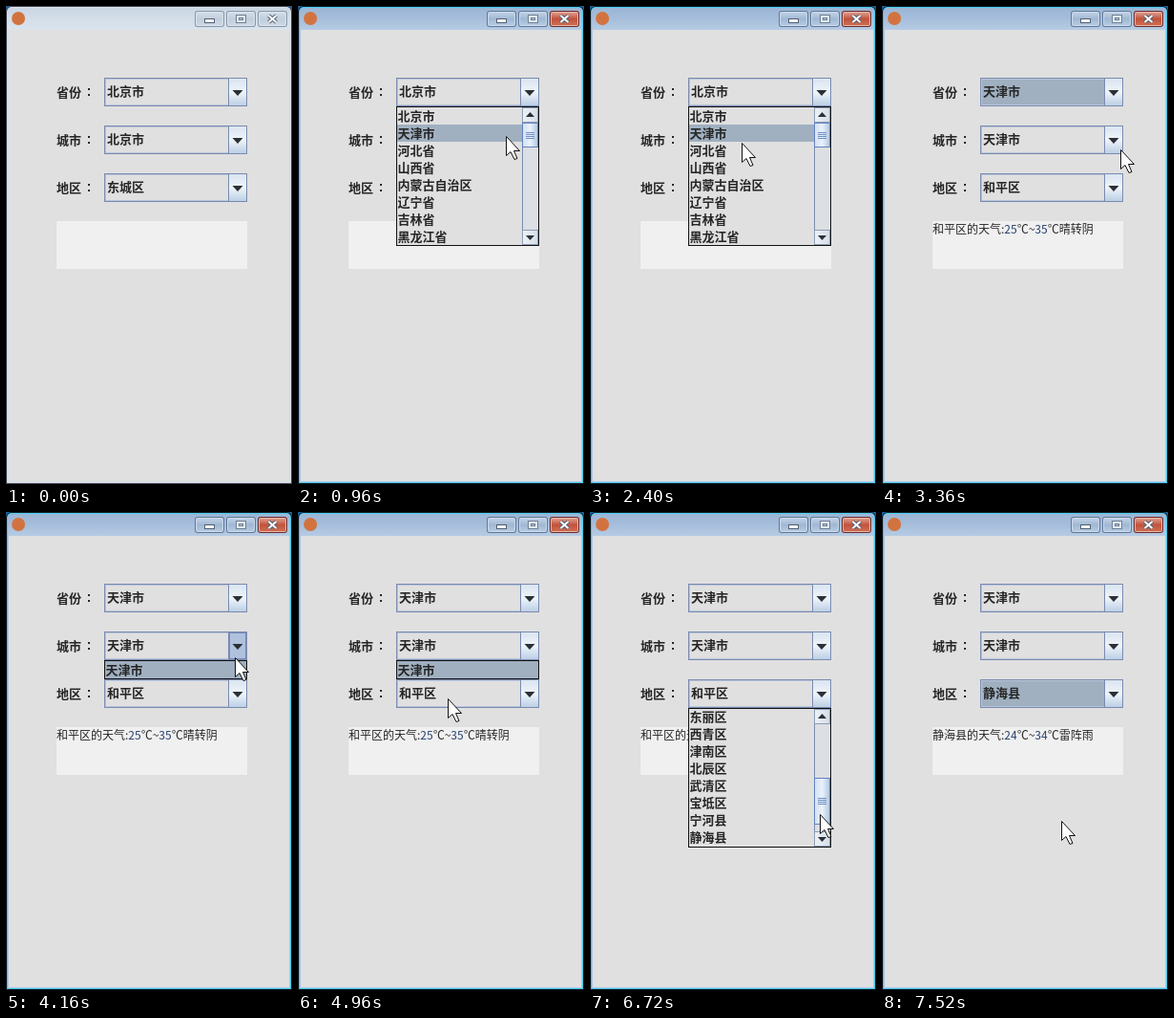
An HTML page with a canvas that plays this animation: 300x500 px, repeating every 8000 ms.

```html
<!DOCTYPE html>
<html lang="zh-CN">
<head>
<meta charset="utf-8">
<title>天气</title>
<style>
html, body { margin: 0; width: 100%; height: 100%; overflow: hidden; background: #e0e0e0; }
canvas { display: block; }
</style>
</head>
<body>
<canvas id="stage" width="300" height="500"></canvas>
<script>
const c = document.getElementById('stage').getContext('2d');
const LOOP = 8000, STEP = 160, ROW = 18, ROWS = 8, TRAVEL = 640;
const BG = '#e0e0e0', SELECTED = '#a0b0c0', BORDER = '#7a8ab0', INK = '#262626';
const SANS = '"Noto Sans CJK SC", "Noto Sans CJK", sans-serif';
const BOLD = 'bold 13px ' + SANS, PLAIN = '12px ' + SANS;

// Moments of the clicks
const OPEN_PROVINCE = 640, PICK_PROVINCE = 2720, OPEN_CITY = 3840,
  OPEN_DISTRICT = 5440, GRAB = 6240, DROP = 6720, PICK_DISTRICT = 7520;

const provinces = '北京市 天津市 河北省 山西省 内蒙古自治区 辽宁省 吉林省 黑龙江省'.split(' ');
const districts = ('和平区 河东区 河西区 南开区 河北区 红桥区 塘沽区 汉沽区 大港区 ' +
  '东丽区 西青区 津南区 北辰区 武清区 宝坻区 宁河县 静海县 蓟县').split(' ');
const PROVINCE_COUNT = 34;

// Pointer stops: arrival time, x, y
const stops = [
  [STEP, 284, 150], [OPEN_PROVINCE, 240, 90], [960, 218, 136], [1120, 179, 191],
  [1440, 159, 181], [2400, 159, 143], [3360, 250, 150], [3680, 240, 145],
  [4160, 240, 152], [4960, 157, 195], [5120, 157, 195], [OPEN_DISTRICT, 239, 190],
  [5760, 181, 275], [GRAB, 240, 260], [DROP, 241, 316], [7200, 204, 342],
  [PICK_DISTRICT, 188, 323]
];

const within = (t, a, b) => t >= a && t < b;
const clamp = (v, a, b) => Math.min(Math.max(v, a), b);

// The pointer rests at a stop, then spends at most TRAVEL on the way to the next
function pointerAt(t) {
  const i = clamp(stops.findIndex(s => s[0] >= t), 1, stops.length - 1);
  const [t0, x0, y0] = stops[i - 1], [t1, x1, y1] = stops[t > PICK_DISTRICT ? stops.length - 1 : i];
  const from = Math.max(t0, t1 - TRAVEL);
  const p = t > PICK_DISTRICT ? 1 : clamp((t - from) / (t1 - from), 0, 1);
  return [Math.round(x0 + (x1 - x0) * p), Math.round(y0 + (y1 - y0) * p)];
}

function dragAt(t) {
  return t < GRAB ? 0 : pointerAt(Math.min(t, DROP))[1] - pointerAt(GRAB)[1];
}

const scrollOf = drag => Math.round(drag * 2.91);

// Last row the pointer has touched since the list opened
function hoverAt(t, opened, top) {
  let row = 0;
  for (let s = opened; s <= t; s += STEP) {
    const [x, y] = pointerAt(s);
    if (within(x, 104, 235)) {
      row = Math.max(0, Math.floor((y - top - 3 + scrollOf(dragAt(s))) / ROW));
    }
  }
  return row;
}

function rect(x, y, w, h, fill) {
  c.fillStyle = fill;
  c.fillRect(x, y, w, h);
}

function box(x, y, w, h, edge, fill) {
  rect(x, y, w, h, edge);
  rect(x + 1, y + 1, w - 2, h - 2, fill);
}

function round(x, y, w, h, r, fill) {
  c.fillStyle = fill;
  c.beginPath();
  c.roundRect(x, y, w, h, r);
  c.fill();
}

function shade(x0, y0, x1, y1, ...colors) {
  const g = c.createLinearGradient(x0, y0, x1, y1);
  colors.forEach((color, i) => g.addColorStop(i / (colors.length - 1), color));
  return g;
}

function text(s, x, y, font = BOLD, color = INK) {
  c.font = font;
  c.fillStyle = color;
  c.fillText(s, x, y);
  return x + c.measureText(s).width;
}

function triangle(x, y, half, h) {
  c.fillStyle = '#2b2f36';
  c.beginPath();
  c.moveTo(x - half, y);
  c.lineTo(x + half, y);
  c.lineTo(x, y + h);
  c.fill();
}

const BUTTON = {
  idle: ['#8796a8', '#dbe4ec', '#d2dde8', '#c1cedb', '#ccd8e4'],
  blue: ['#5f7896', '#cbdaeb', '#bfd0e5', '#a0b8d4', '#b4cae2'],
  red: ['#6b2c2c', '#e6b3a6', '#dc9a8a', '#c2533c', '#cd6d50']
};

function titleButton(x, [edge, light, ...fill]) {
  [edge, light, shade(0, 7, 0, 20, ...fill)].forEach((color, i) =>
    round(x + i, 5 + i, 31 - 2 * i, 17 - 2 * i, 3 - i, color));
}

function frame(active) {
  rect(0, 0, 300, 500, '#1b62a0');
  const rings = active ? ['#14202a', '#4fd2f4', '#b4cde6'] : ['#4a4a58', '#dde4eb', '#d5dee7'];
  rings.forEach((color, i) =>
    round(i, i, 300 - 2 * i, 500 - 2 * i, [6 - i, 6 - i, 0, 0], color));
  const title = active ? ['#9bb5d5', '#a6bedb', '#b6cbe4'] : ['#cad6e3', '#d3dee9', '#dbe4ed'];
  round(2, 2, 296, 23, [4, 4, 0, 0], shade(0, 2, 0, 25, ...title));
  rect(3, 25, 294, 472, BG);
  round(6, 6, 14, 14, 7, '#d2733f');

  titleButton(198, active ? BUTTON.blue : BUTTON.idle);
  titleButton(231, active ? BUTTON.blue : BUTTON.idle);
  titleButton(264, active ? BUTTON.red : BUTTON.idle);
  const edge = '#505e70', faded = '#6f7f93';
  box(208, 13, 11, 5, edge, '#fff');
  box(241, 9, 11, 9, faded, '#dfe7f0');
  box(244, 12, 5, 3, faded, '#b5c4d6');
  for (const [color, width] of [[edge, 4], ['#fff', 2]]) {
    c.strokeStyle = color;
    c.lineWidth = width;
    c.beginPath();
    c.moveTo(275.5, 10); c.lineTo(283.5, 17);
    c.moveTo(283.5, 10); c.lineTo(275.5, 17);
    c.stroke();
  }
}

function combo(y, label, value, focused, pressed) {
  text(label, 53, y + 20);
  rect(86, y + 11, 2, 2, INK);
  rect(86, y + 17, 2, 2, INK);
  box(103, y, 150, 30, BORDER, '#b9c5d8');
  rect(105, y + 2, 128, 26, focused ? SELECTED : BG);
  box(233, y, 20, 30, BORDER, shade(0, y, 0, y + 30, '#d8e4f0', '#eff4f9', '#b8cde3'));
  if (pressed) box(234, y + 1, 18, 28, BORDER, '#b0c1de');
  triangle(243, y + 13, 5.5, 6);
  text(value, 106, y + 19);
}

function scrollbar(y, thumbY, thumbH) {
  rect(235, y + 1, 17, 144, '#dcdfe3');
  rect(235, y + 1, 1, 144, BORDER);
  for (const by of [y + 1, y + 129]) {
    box(235, by, 17, 16, '#8c9db5', shade(235, 0, 252, 0, '#eef2f6', '#d4dee9'));
  }
  triangle(243.5, y + 11, 4.5, -5);
  triangle(243.5, y + 135, 4.5, 5);
  box(235, thumbY, 17, thumbH, '#6382bf', shade(236, 0, 251, 0, '#d3e2f3', '#e9f1fa', '#b4cbe6'));
  const mid = thumbY + Math.floor(thumbH / 2);
  for (let i = -3; i <= 3; i += 2) rect(239, mid + i, 9, 1, '#6f8fc4');
}

function popup(y, items, count, selected, drag = 0) {
  const h = Math.min(ROWS, items.length) * ROW + 2;
  const wide = count > ROWS ? 131 : 148;
  box(103, y, 150, h, '#111', BG);
  c.save();
  c.beginPath();
  c.rect(104, y + 1, wide, h - 2);
  c.clip();
  items.forEach((item, i) => {
    const top = y + 1 + i * ROW - scrollOf(drag);
    if (i === selected) rect(104, top, wide, ROW, SELECTED);
    text(item, 104.5, top + 14);
  });
  c.restore();
  if (count > ROWS) scrollbar(y, y + 17 + drag, Math.round(111 * ROWS / count));
}

function weather(line) {
  rect(53, 225, 200, 50, '#f0f0f0');
  let x = 53;
  for (const part of line.split(/(\d+)/)) {
    x = text(part, x, 238, PLAIN, /\d/.test(part) ? '#28406e' : INK);
  }
}

function pointer(x, y) {
  c.save();
  c.translate(x + .5, y + .5);
  c.beginPath();
  [[0, 0], [0, 20], [4.5, 16], [8.5, 24], [11.5, 23], [8, 15], [14, 15]]
    .forEach(p => c.lineTo(...p));
  c.closePath();
  c.fillStyle = '#fff';
  c.strokeStyle = '#111';
  c.lineWidth = 1;
  c.fill();
  c.stroke();
  c.restore();
}

function draw(t) {
  const chosen = t >= PICK_PROVINCE, done = t >= PICK_DISTRICT;
  const city = chosen ? '天津市' : '北京市';

  frame(t >= OPEN_PROVINCE);
  combo(75, '省份', city, within(t, PICK_PROVINCE, OPEN_CITY), false);
  combo(125, '城市', city, false, within(t, OPEN_CITY, OPEN_CITY + 3 * STEP));
  combo(175, '地区', done ? '静海县' : chosen ? '和平区' : '东城区', done, false);
  weather(done ? '静海县的天气:24℃~34℃雷阵雨' : chosen ? '和平区的天气:25℃~35℃晴转阴' : '');

  if (within(t, OPEN_PROVINCE, PICK_PROVINCE)) {
    popup(105, provinces, PROVINCE_COUNT, hoverAt(t, OPEN_PROVINCE, 105));
  }
  if (within(t, OPEN_CITY, OPEN_DISTRICT)) popup(155, ['天津市'], 1, 0);
  if (within(t, OPEN_DISTRICT, PICK_DISTRICT)) {
    popup(205, districts, districts.length, hoverAt(t, OPEN_DISTRICT, 205), dragAt(t));
  }
  if (t >= STEP) pointer(...pointerAt(t));
}

const start = performance.now();
function tick() {
  const t = (performance.now() - start) % LOOP;
  draw(Math.floor(t / STEP) * STEP);
  requestAnimationFrame(tick);
}
tick();
</script>
</body>
</html>
```
